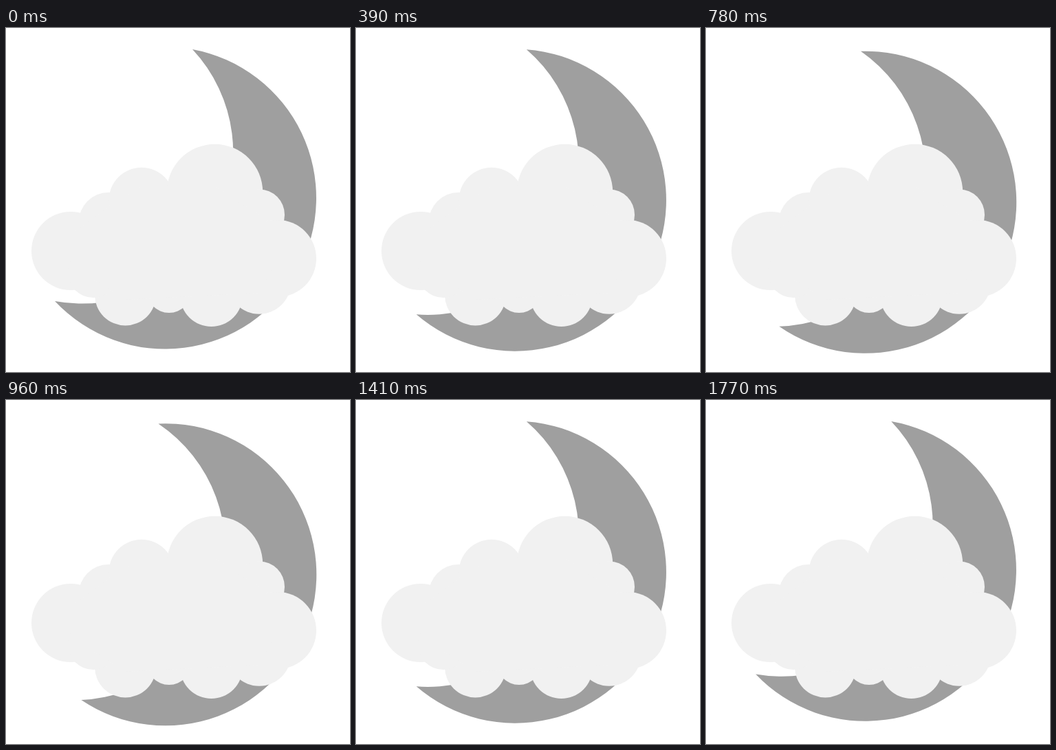
Write an HTML page that moves like this. It is 500x500 px and loops after 1800 ms.

```html
<!DOCTYPE html>
<html lang="en">
<head>
<meta charset="utf-8">
<title>Moon behind a cloud</title>
<style>
  html, body { margin: 0; width: 100%; height: 100%; overflow: hidden; background: #fff; }
  svg { display: block; width: 100%; height: 100%; }
</style>
</head>
<body>
<svg viewBox="0 0 500 500">
  <path id="moon" fill="#9f9f9f" d="M271 31A219.6 219.6 0 1 1 71 397A219.6 219.6 0 0 0 271 31Z"/>
  <g fill="#f1f1f1">
    <circle cx="94" cy="324" r="57"/>
    <circle cx="149" cy="282.3" r="43.3"/>
    <circle cx="197" cy="250.3" r="47.5"/>
    <circle cx="303.5" cy="238.5" r="69.7"/>
    <circle cx="368" cy="271.5" r="37"/>
    <circle cx="395" cy="335" r="56"/>
    <circle cx="368" cy="369.8" r="46"/>
    <circle cx="298.5" cy="388.6" r="45.4"/>
    <circle cx="237" cy="381" r="33"/>
    <circle cx="173.5" cy="388" r="44.5"/>
    <circle cx="127" cy="355" r="37"/>
    <path d="M94 300L149 260L197 230L303 230L368 272L395 335L368 385L173 395L127 365Z"/>
  </g>
</svg>
<script>
  const LOOP = 1800, STEP = 30, SWING = 14;
  const moon = document.getElementById('moon');

  // The moon rocks back and forth at constant speed around its box centre.
  function draw() {
    const t = Math.floor(performance.now() % LOOP / STEP) * STEP;
    const swing = 1 - Math.abs(1 - 2 * t / LOOP);
    moon.setAttribute('transform', `rotate(${-SWING * swing} 261 249)`);
    requestAnimationFrame(draw);
  }
  draw();
</script>
</body>
</html>
```
